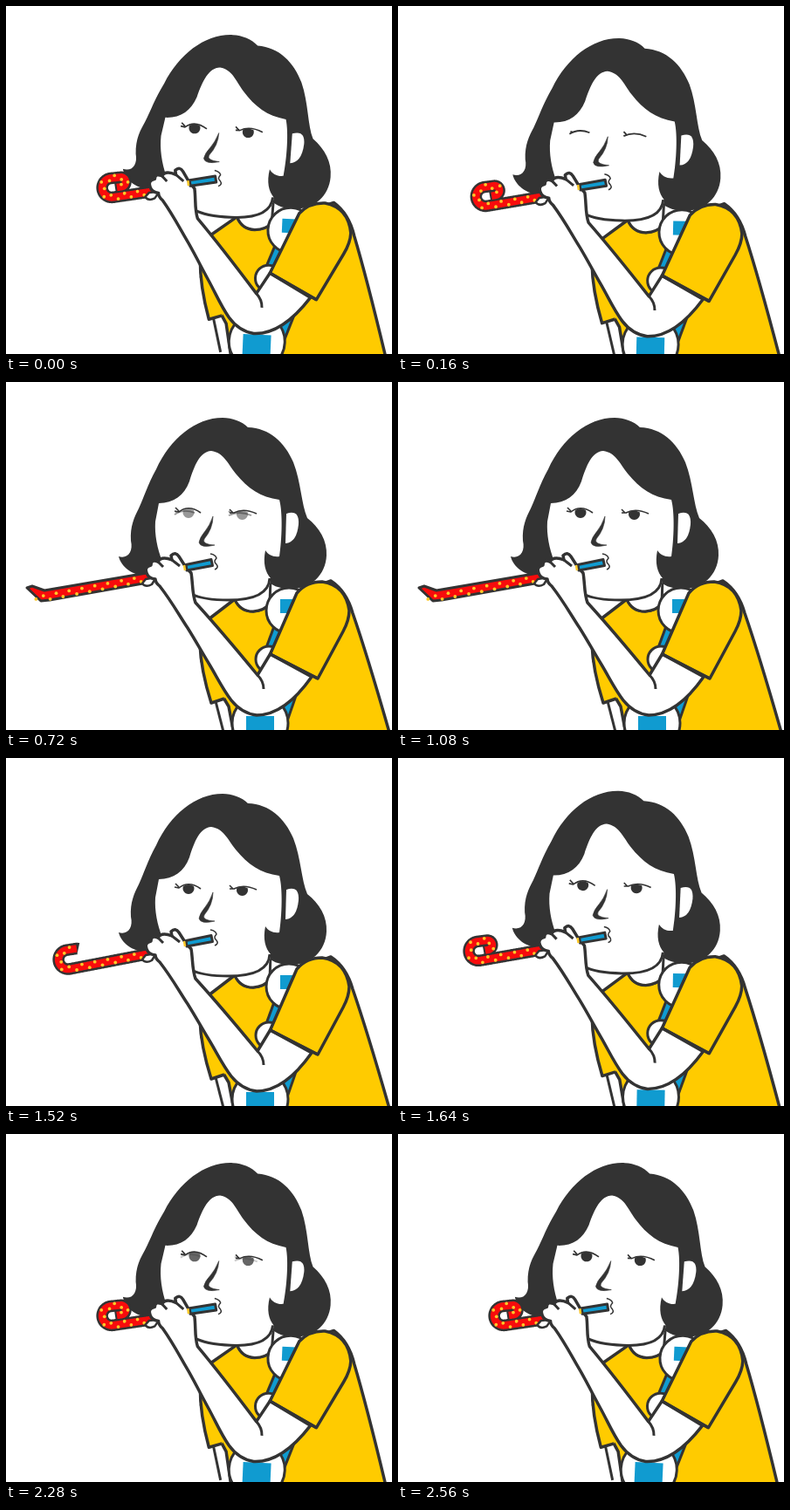
Recreate the animation shown at these times as an HTML page with a canvas. Size 442x399 px, loop 3200 ms.

```html
<!DOCTYPE html>
<html>
<head>
<meta charset="utf-8">
<style>
html, body { margin: 0; width: 442px; height: 399px; overflow: hidden; background: #fff; }
canvas { display: block; }
</style>
</head>
<body>
<canvas id="stage" width="442" height="399"></canvas>
<script>
const ctx = document.getElementById('stage').getContext('2d');
const LOOP = 3200, STEP = 40, TILT = 0.044, PIVOT = [432, 303];
const DARK = '#333', YELLOW = '#ffcb00', BLUE = '#109bd0', RED = '#f80c0c', DOT = '#ffc928';

// Keys are [time, value] pairs.
const lean = [[0, 0], [320, 1], [1520, 1], [1800, 0], [LOOP, 0]];
const curl = [[0, 95], [400, 48], [560, 32], [600, 17], [1320, 17], [1360, 32], [1520, 48], [1800, 95], [LOOP, 95]];
const eyes = [[0, 1], [160, 0], [560, 0], [720, .5], [1080, 1], [2240, 1], [2400, 0], [2560, 1], [LOOP, 1]];

function at(keys, t) {
  const i = keys.findIndex(k => k[0] > t);
  const [t0, a] = keys[i - 1], [t1, b] = keys[i];
  return a + (b - a) * (t - t0) / (t1 - t0);
}

const smooth = u => u * u * (3 - 2 * u);

function shape(d, fill, width = 0, color = DARK) {
  const path = new Path2D(d);
  if (fill) { ctx.fillStyle = fill; ctx.fill(path); }
  if (width) { ctx.strokeStyle = color; ctx.lineWidth = width; ctx.stroke(path); }
}

function disc(x, y, r, fill, width = 0) {
  ctx.beginPath();
  ctx.arc(x, y, r, 0, 7);
  ctx.fillStyle = fill;
  ctx.fill();
  if (width) { ctx.strokeStyle = DARK; ctx.lineWidth = width; ctx.stroke(); }
}

function square(x, y, size) {
  ctx.fillStyle = BLUE;
  ctx.fillRect(x, y, size, size);
}

function strap(d) {
  shape(d, null, 16);
  shape(d, null, 10, BLUE);
}

function body() {
  shape('M232 272L262 249Q268 263 283 263Q296 262 302 254L340 240L372 228Q390 240 397 265Q416 320 447 430L266 430L255 372L224 320Z', YELLOW, 3.5);
  shape('M262 249Q268 263 283 263Q296 262 302 254L303 225Z', '#fff', 3);
  shape('M240 366L250 405', null, 3);
  shape('M232 272L222 300Q223 330 235 368L250 363L270 330Z', YELLOW);
  shape('M232 272L222 300Q223 330 235 368L250 363', null, 3.5);
  strap('M322 258L300 318');
  strap('M332 340L314 392');
  disc(324, 262, 26, '#fff', 3);
  square(314, 249, 16);
  disc(301, 318, 15, '#fff', 3);
  disc(291, 391, 32, '#fff', 3);
  square(275, 383, 32);
  shape('M302.5 312L333 242Q344 229 362 229Q389 233 393 262Q393 273 386 286L357 340Z', YELLOW, 3.5);
}

function head(open) {
  shape('M129 200C139 203 146 195 143 182C142 165 147 155 152 145C158 132 162 118 172 100C188 65 217 41 248 41C259 41 270 45 277 52C302 53 319 69 329 92C338 115 338 140 345 156C359 167 368 182 367 199C366 222 348 238 325 237C312 237 303 233 298 226L240 215L160 222C145 222 132 212 129 200Z', DARK);
  shape('M175 139C192 139 204 130 210 114C216 95 222 80 235 79C249 81 253 92 263 105C277 122 291 132 313 135C317 150 316 180 313 200C306 201 300 198 297 193C294 208 297 218 303 225C303 243 282 251 255 250C232 250 214 246 200 235C184 225 169 190 171 160Z', '#fff');
  shape('M302 225C301 243 282 250 255 250C238 250 222 248 212 243', null, 3);
  shape('M321 151Q336 146 335 163Q333 184 320 185Z', '#fff');
  shape('M237 154Q237 168 227 180Q224 186 239 187Q223 191 221 184Q222 178 228 171Q233 165 237 154Z', DARK, .6);
  shape('M234 197Q240 198 241 202Q237 206 241 209Q244 213 239 215', null, 1.5);

  ctx.globalAlpha = 1 - open;
  shape('M193 152Q203 145 216 150M194 149L197 150M255 153Q267 147 281 153M255 148L258 151', null, 1.8);
  ctx.globalAlpha = Math.min(1, open * 2);
  shape('M193 148L198 149Q209 140 223 150M256 150L261 150Q272 144 287 151M194 144L198 148M256 146L260 150', null, 1.6);
  ctx.globalAlpha = open;
  shape('M203 147Q209 143 215 147A6.5 6.5 0 1 1 203 147ZM264.5 149Q270 146 276.5 149A6.5 6.5 0 1 1 264.5 149Z', DARK);
  ctx.globalAlpha = 1;
}

// Centre line of the blower: a straight run, then a flat roll.
function tube(roll) {
  const points = [], straight = 143 - roll, end = straight + Math.min(roll, 70);
  let x = 166, y = 224, a = Math.PI - .19;
  for (let l = 0; l <= end; l++) {
    points.push([x, y, a]);
    const r = l - straight;
    if (r >= 0 && r < 34.5) a += 1 / 11;
    else if (r >= 46 && r < 63) a += 1 / 5.5;
    x += Math.cos(a);
    y += Math.sin(a);
  }
  return points;
}

function line(points, width, color) {
  ctx.beginPath();
  points.forEach(p => ctx.lineTo(p[0], p[1]));
  ctx.lineWidth = width;
  ctx.strokeStyle = color;
  ctx.stroke();
}

function blower(roll) {
  const points = tube(roll);
  if (roll < 25) {
    shape('M167 218L44 239L30 234L24 236L40 251L50 250L168 229Z', RED, 3);
  } else {
    line(points, 13.5, DARK);
    line(points.slice(0, -2), 8.5, RED);
  }
  for (let l = 12, side = 1; l < points.length - 4; l += 7.6, side = -side) {
    const [x, y, a] = points[Math.floor(l)];
    disc(x + 2.6 * side * Math.sin(a), y - 2.6 * side * Math.cos(a), 1.9, DOT);
  }
}

function arm() {
  shape('M156 231Q160 236 167 232L172 224L160 226Z', '#fff', 2.5);
  shape('M302.5 312L288 336C265 308 238 276 217 253C213 243 214 230 212 219L205 211L198 200Q194 194 189 199L190 204Q178 199 174 206Q166 203 166 210Q158 212 161 219Q163 225 171 226Q171 230 176 234C190 252 198 267 208 282C218 298 225 311 233 324C242 339 248 352 258 365Q270 380 287 382Q319 382 350 338Z', '#fff', 3.5);
  shape('M288 336Q295 343 295 352M174 206L180 212M190 204L199 211', null, 3);
  shape('M302.5 312L357 340', null, 3.5);
}

function mouthpiece() {
  shape('M206 209.5L235 203.5L236.5 210.5L207 216Z', BLUE, 3);
  shape('M204 210L205 216', null, 2.5, DOT);
}

function draw(now) {
  const t = Math.floor(now % LOOP / STEP) * STEP;
  ctx.setTransform(1, 0, 0, 1, 0, 0);
  ctx.fillStyle = '#fff';
  ctx.fillRect(0, 0, 442, 399);
  ctx.lineJoin = 'round';
  ctx.translate(...PIVOT);
  ctx.rotate(TILT * (1 - smooth(at(lean, t))));
  ctx.translate(-PIVOT[0], -PIVOT[1]);
  body();
  head(at(eyes, t));
  blower(at(curl, t));
  arm();
  mouthpiece();
}

const start = performance.now();
function tick() {
  draw(performance.now() - start);
  requestAnimationFrame(tick);
}
tick();
</script>
</body>
</html>
```
